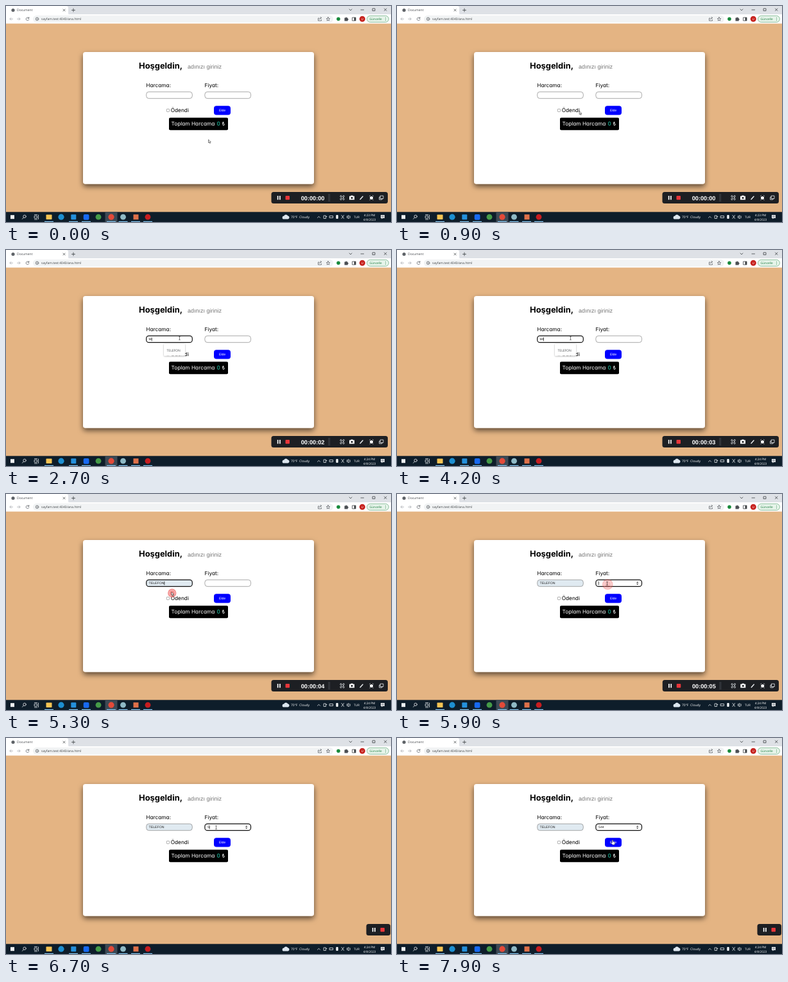
These frames come from a looping animation (600x338 px, 8 s). An HTML page:

```html
<!DOCTYPE html>
<html lang="tr">
<head>
<meta charset="utf-8">
<title>Document</title>
<style>
  html, body { margin: 0; width: 100%; height: 100%; overflow: hidden; background: #e4b483; }
  svg { display: block; width: 100%; height: 100%; }
  text { font-family: "Open Sans", sans-serif; font-size: 5px; text-rendering: geometricPrecision; white-space: pre; }
  .page { font-family: Inter, sans-serif; font-size: 8.3px; font-feature-settings: "cv11"; }
  .form { font-family: "Liberation Sans", Arial, sans-serif; font-size: 5.2px; }
  .line { fill: none; stroke-width: .8; stroke-linecap: round; stroke-linejoin: round; }
  .dark { stroke: #5f6368; }
  .light { stroke: #e8ebee; }
</style>
</head>
<body>
<svg viewBox="0 0 600 338" preserveAspectRatio="none">
  <defs>
    <filter id="shade" x="-10%" y="-10%" width="120%" height="125%">
      <feDropShadow dx="0" dy="4" stdDeviation="4.5" flood-color="#000" flood-opacity=".6"/>
    </filter>
    <filter id="soft" x="-20%" y="-20%" width="140%" height="150%">
      <feDropShadow dx="0" dy=".7" stdDeviation=".8" flood-color="#000" flood-opacity=".35"/>
    </filter>
    <clipPath id="panelClip"><rect id="clipBox" y="291" height="18" rx="3.5"/></clipPath>
  </defs>

  <rect width="600" height="338" fill="#e4b483"/>

  <!-- browser window -->
  <rect width="600" height="13.5" fill="#dee1e6"/>
  <path d="M0 13.5V0H94Q97 0 97 3V11Q97 13.5 99 13.5Z" fill="#fff"/>
  <rect y="13" width="600" height="14.5" fill="#fff"/>
  <circle cx="11" cy="6.5" r="2.6" fill="#5f6368"/>
  <text x="17" y="8.3" fill="#45494d">Document</text>
  <path class="line" stroke="#3c4043" d="M89 5l3 3m0-3l-3 3M102.5 6.5h5m-2.500-2.500v5M535 5l2 2 2-2M553 6h4.500M571.500 4h3.500v3.500h-3.500zM589.500 4l3.500 3.500m0-3.500l-3.500 3.500"/>
  <rect x="42" y="14.800" width="468" height="11" rx="5.500" fill="#f1f3f4"/>
  <path class="line" stroke="#a9adb1" d="M10.500 20.300h-4.500m2-2l-2 2 2 2M17.500 20.300h4.500m-2-2l2 2-2 2"/>
  <path class="line dark" d="M35.500 18.800a2.400 2.400 0 1 0 .4 2.300M35.800 17.500v1.800h-1.800"/>
  <circle class="line dark" cx="48.500" cy="20.300" r="2.300"/>
  <path class="line dark" d="M48.500 20.200v1.100M48.500 19v.1"/>
  <text x="55" y="22.200" fill="#3c4043">sayfam.test:4040/ana.html</text>
  <path class="line dark" d="M488 19h-1.500v4h5v-1.500M488.500 21q0-2.500 3-2.500m-1.200-1.300l1.300 1.300-1.300 1.300"/>
  <path class="line dark" d="M502 17.500l.8 1.900 2 .2-1.500 1.400.4 2-1.700-1-1.700 1 .4-2-1.500-1.400 2-.2z"/>
  <circle cx="518" cy="20.300" r="2.800" fill="#188a3c"/>
  <path fill="#4b4f53" d="M527.500 18.500h1.700a1 1 0 0 1 2 0h1.500v1.600a1 1 0 0 1 0 2v1.400h-5.200z"/>
  <path class="line" stroke="#3c4043" d="M540 18h5v5h-5z"/>
  <path fill="#3c4043" d="M542.500 18h2.500v5h-2.500z"/>
  <circle cx="555.300" cy="20.300" r="4.500" fill="#c6211d"/>
  <text x="555.300" y="22" text-anchor="middle" fill="#fff" style="font-size:4.600px">U</text>
  <rect x="562.500" y="15.300" width="34" height="10" rx="5" fill="#e6f4ea" stroke="#62a779" stroke-width=".7"/>
  <text x="566.500" y="22" fill="#187a3b" style="font-size:4.700px">Güncelle</text>
  <path class="line" stroke="#187a3b" d="M591.500 18.300v.1m0 1.900v.1m0 1.900v.1"/>

  <!-- card -->
  <rect x="120" y="72" width="360" height="206.500" rx="4" fill="#fff" filter="url(#shade)"/>
  <text class="page" x="207" y="98" style="font-size:12.900px;font-weight:700">Hoşgeldin,</text>
  <text class="form" x="283" y="97.700" fill="#757575" style="font-size:9px">adınızı giriniz</text>
  <text class="page" x="218.300" y="127">Harcama:</text>
  <text class="page" x="309.600" y="127">Fiyat:</text>
  <rect id="boxA" x="218.700" y="134.300" width="71.600" height="10.400" rx="4"/>
  <rect id="boxB" x="309.900" y="134.300" width="71.600" height="10.400" rx="4"/>
  <text id="textA" class="form" x="222.600" y="141.300" fill="#222"></text>
  <text id="textB" class="form" x="314" y="141.300" fill="#222"></text>
  <path id="caret" stroke="#000" stroke-width=".7" d="M0 136.800v5.600"/>
  <path id="spin" fill="#444" d="M373 139l1.700-2 1.700 2zM373 140.200l1.700 2 1.700-2z"/>
  <rect x="250.300" y="161.200" width="4.200" height="4.200" rx=".8" fill="#fff" stroke="#767676" stroke-width=".6"/>
  <text class="page" x="256.700" y="166">Ödendi</text>
  <rect x="324" y="156.200" width="26" height="14.300" rx="4" fill="#00f"/>
  <text class="form" x="337" y="165.200" text-anchor="middle" fill="#fff">Ekle</text>
  <rect x="254" y="174.700" width="92" height="19.600" rx="2" fill="#000"/>
  <text class="page" x="257.500" y="187" fill="#fff">Toplam Harcama</text>
  <text class="page" x="328.600" y="187" fill="#1fd6b5">0</text>
  <text class="page" x="336.500" y="187" fill="#fff">₺</text>

  <g id="menu">
    <rect id="menuBox" x="246" y="147" width="33" rx="1" fill="#fff" filter="url(#soft)"/>
    <rect id="hover" x="246" y="150" width="33" height="13.500" fill="#e9eaeb"/>
    <g id="items" fill="#44474a"></g>
  </g>

  <!-- taskbar -->
  <rect y="322.300" width="600" height="15.700" fill="#0e1d2a"/>
  <rect x="154.500" y="322.300" width="19" height="15.700" fill="#3c4954"/>
  <rect x="7" y="327.200" width="6" height="6" fill="#f2f5f7"/>
  <circle class="line light" cx="29" cy="329.300" r="2.200"/>
  <path class="line light" d="M27.400 331l-2 2.300M44.500 328.500h4v3.500h-4zM44.500 326.500h4m-4 7.500h4M50.500 327v6.500"/>
  <rect x="62.500" y="326.500" width="9" height="7.500" rx=".8" fill="#f6c453"/>
  <circle cx="86" cy="330.200" r="4.600" fill="#1d8fd1"/>
  <rect x="101.300" y="326.200" width="8" height="8" rx="1" fill="#2490dc"/>
  <rect x="120.700" y="325.900" width="8.800" height="8.800" rx="2" fill="#1769f2"/>
  <circle cx="144" cy="330.200" r="4.400" fill="#459b48"/>
  <circle cx="164" cy="330.200" r="4.600" fill="#e34a39"/>
  <circle cx="182.500" cy="330.200" r="4.400" fill="#8fb9c5"/>
  <rect x="198.500" y="326.200" width="8" height="8" fill="#dd7049"/>
  <circle cx="221" cy="330.200" r="4.400" fill="#c71d20"/>
  <g id="marks" fill="#82c3ee"></g>
  <path fill="#dce6ef" d="M433 333.500a2.500 2.500 0 0 1 .2-5 3.300 3.300 0 0 1 6-.3 2.700 2.700 0 0 1 .3 5.300z"/>
  <text x="444" y="332" fill="#fff">70°F  Cloudy</text>
  <path class="line light" d="M485.500 331.300l2-2 2 2M495.500 328h3v4.500h-3zm3 1.500h1.500M504.500 328.500h5v3h-5zM523 327.500l3.500 5m0-5l-3.500 5M531.500 329v2.500h1l1.500 1.500v-5.500l-1.500 1.500zM536 328.500q1 1.700 0 3.400"/>
  <rect x="514.300" y="327" width="3.400" height="6" rx="1" fill="#eef1f3"/>
  <text x="542" y="332" fill="#fff" style="font-size:4.700px">TUR</text>
  <text id="clock" x="566.500" y="328.600" text-anchor="middle" fill="#fff" style="font-size:4.700px"></text>
  <text x="566.500" y="335.900" text-anchor="middle" fill="#fff" style="font-size:4.700px">4/8/2023</text>
  <path fill="#f1f3f5" d="M584 327h6v5h-3l-1.500 1.500v-1.500h-1.500z"/>
  <path class="line" stroke="#0e1d2a" style="stroke-width:.5" d="M585.200 328.700h3.600m-3.600 1.500h3.600"/>

  <!-- recorder bar -->
  <g clip-path="url(#panelClip)">
    <rect x="400" y="291" width="200" height="18" fill="#1d1f23"/>
    <g id="panel">
      <path fill="#fff" d="M9.300 297h1.700v6.200h-1.700zM12.600 297h1.700v6.200h-1.700z"/>
      <rect x="22" y="297" width="6.500" height="6.300" rx="1" fill="#e8363a"/>
      <text id="timer" class="form" x="64.600" y="303.500" text-anchor="middle" fill="#fff" style="font-size:9.200px;font-weight:700"></text>
      <rect x="88.500" y="294" width="3.300" height="12" fill="#303338"/>
      <circle class="line light" cx="110.500" cy="300" r="2"/>
      <path class="line light" d="M107.500 298.500v-1.700h1.700m2.600 0h1.700v1.700m0 3v1.700h-1.700m-2.600 0h-1.700v-1.700"/>
      <path fill="#fff" d="M121.500 297.500h2l.7-1h2.600l.7 1h2v5.700h-8z"/>
      <circle cx="125.500" cy="300.300" r="1.500" fill="#1d1f23"/>
      <path class="line light" style="stroke-width:1.500" d="M138.500 302.500l4-4.500"/>
      <circle cx="156" cy="300.200" r="2.500" fill="#fff"/>
      <path class="line light" d="M153 297.500l1-1m4 0l1 1M154 303l-.7.700m4.700-.7l.7.700"/>
      <path class="line light" d="M170 297h4.500v4.500h-4.500zM170 299h-1.800v4h4.300v-1.500"/>
    </g>
  </g>

  <!-- pointer -->
  <g id="ring">
    <circle id="ringDisc" fill="#ee4a48" fill-opacity=".62"/>
    <circle id="ringLine" fill="none" stroke="#fff" stroke-opacity=".6" stroke-width=".8"/>
  </g>
  <g id="pointer">
    <path id="arrow" d="M0 0v5l1.200-1 .9 1.900.9-.4-.9-1.800h1.600z" fill="#fff" stroke="#000" stroke-width=".5"/>
    <path id="beam" d="M-1.300-2.800q1.300 0 1.300.6 0-.6 1.300-.6M0-2.400v4.800M-1.300 2.800q1.300 0 1.300-.6 0 .6 1.300.6" fill="none" stroke="#222" stroke-width=".6"/>
    <path id="hand" d="M-.7-1.500q.7-.8 1.400 0v2.200l2.400.6q.7.300.6 1.200l-.7 3h-3.200l-2.200-2.800q-.2-1 .8-.7l.9.600z" fill="#fff" stroke="#111" stroke-width=".4"/>
  </g>
</svg>

<script>
const $ = id => document.getElementById(id);
const LOOP = 8000, BLINK = 530;
const FOCUS_A = 1400, PREVIEW = 4800, PICK = 5200, FOCUS_B = 5650;

const words = ["canta", "camta", "TABLET", "TELEFON", "tablet", "gdgf"];
const typedA = [[0, ""], [2400, "t"], [2700, "te"], [3100, "tel"], [PREVIEW, "TELEFON"]];
const typedB = [[0, ""], [6650, "5"], [7000, "54"], [7300, "544"]];
const seconds = [1400, 2450, 3600, 4600, 5400, 6150];
const resets = [FOCUS_A, 2400, 2700, 3100, PICK, FOCUS_B, 6650, 7000, 7300];
const clicks = [FOCUS_A, PICK, FOCUS_B];
const path = [
  [100, 315.5, 209], [750, 288, 172], [1250, 270.5, 138], [4550, 270.5, 138],
  [4900, 258, 153.5], [5350, 258, 153.5], [5620, 327.5, 140], [7250, 327.5, 140], [7900, 336, 161.5]
];

const clamp = v => Math.max(0, Math.min(1, v));
const ease = v => v * v * (3 - 2 * v);
const show = (id, on) => $(id).setAttribute("visibility", on ? "visible" : "hidden");
const set = (id, attrs) => { for (const k in attrs) $(id).setAttribute(k, attrs[k]); };
const write = (id, s) => { if ($(id).textContent !== s) $(id).textContent = s; };
const latest = (list, t) => list.filter(e => e[0] <= t).pop()[1];

$("marks").innerHTML = [67, 105, 125, 164, 182.5, 202, 221]
  .map(x => `<rect x="${x - 7}" y="336.8" width="14" height="1.2"/>`).join("");

function position(t) {
  let i = 0;
  while (i < path.length - 2 && t > path[i + 1][0]) i++;
  const [t0, x0, y0] = path[i], [t1, x1, y1] = path[i + 1];
  const k = ease(clamp((t - t0) / (t1 - t0)));
  return [x0 + (x1 - x0) * k, y0 + (y1 - y0) * k];
}

function drawFields(t) {
  const onA = t >= FOCUS_A && t < FOCUS_B, onB = t >= FOCUS_B;
  const border = on => ({ stroke: on ? "#111" : "#858585", "stroke-width": on ? 1.2 : .7 });
  set("boxA", { ...border(onA), fill: t >= PREVIEW ? "#e0eaf1" : "#fff" });
  set("boxB", { ...border(onB), fill: "#fff" });
  write("textA", latest(typedA, t));
  write("textB", latest(typedB, t));
  show("spin", onB);

  const last = resets.filter(r => r <= t).pop();
  show("caret", (onA || onB) && Math.floor((t - last) / BLINK) % 2 === 0);
  const field = $(onB ? "textB" : "textA");
  const width = field.textContent ? field.getComputedTextLength() : 0;
  set("caret", { transform: `translate(${+field.getAttribute("x") + width + .3} 0)` });
}

function drawMenu(t) {
  const open = t >= 1500 && t < PICK;
  $("menu").style.display = open ? "" : "none";
  if (!open) return;
  const key = latest(typedA, t).toLowerCase();
  const list = words.filter(w => w.toLowerCase().startsWith(key));
  set("menuBox", { height: 14 * list.length + 4.5 });
  show("hover", t >= PREVIEW);
  const html = list.map((w, i) => `<text x="250.6" y="${158.8 + 14 * i}">${w}</text>`).join("");
  if ($("items").dataset.key !== key) {
    $("items").dataset.key = key;
    $("items").innerHTML = html;
  }
}

function drawPanel(t) {
  const k = clamp((t - 5900) / 550);
  const left = 413.5 + 148 * k, right = 595 + 4 * k;
  set("clipBox", { x: left, width: right - left });
  set("panel", { transform: `translate(${left} 0)` });
  write("timer", "00:00:0" + seconds.filter(s => s <= t).length);
  write("clock", t < 2450 ? "4:23 PM" : "4:24 PM");
}

function drawPointer(t) {
  const [x, y] = position(t);
  const inField = y > 134 && y < 145 && ((x > 218 && x < 291) || (x > 309 && x < 382));
  const inButton = y > 156 && y < 171 && x > 324 && x < 350;
  set("pointer", { transform: `translate(${x} ${y})` });
  show("beam", inField);
  show("hand", inButton);
  show("arrow", !inField && !inButton);

  const start = clicks.filter(c => c <= t).pop();
  const age = start === undefined ? 1 : (t - start) / 350;
  show("ring", age < 1);
  set("ring", { transform: `translate(${x + .8} ${y + 1.5})`, opacity: age < .5 ? 1 : clamp(2 - 2 * age) });
  const r = 5.5 + 4 * clamp(age);
  set("ringDisc", { r });
  set("ringLine", { r: r * .68 });
}

function frame(now) {
  const t = now % LOOP;
  drawFields(t);
  drawMenu(t);
  drawPanel(t);
  drawPointer(t);
  requestAnimationFrame(frame);
}
frame(performance.now());
</script>
</body>
</html>
```
